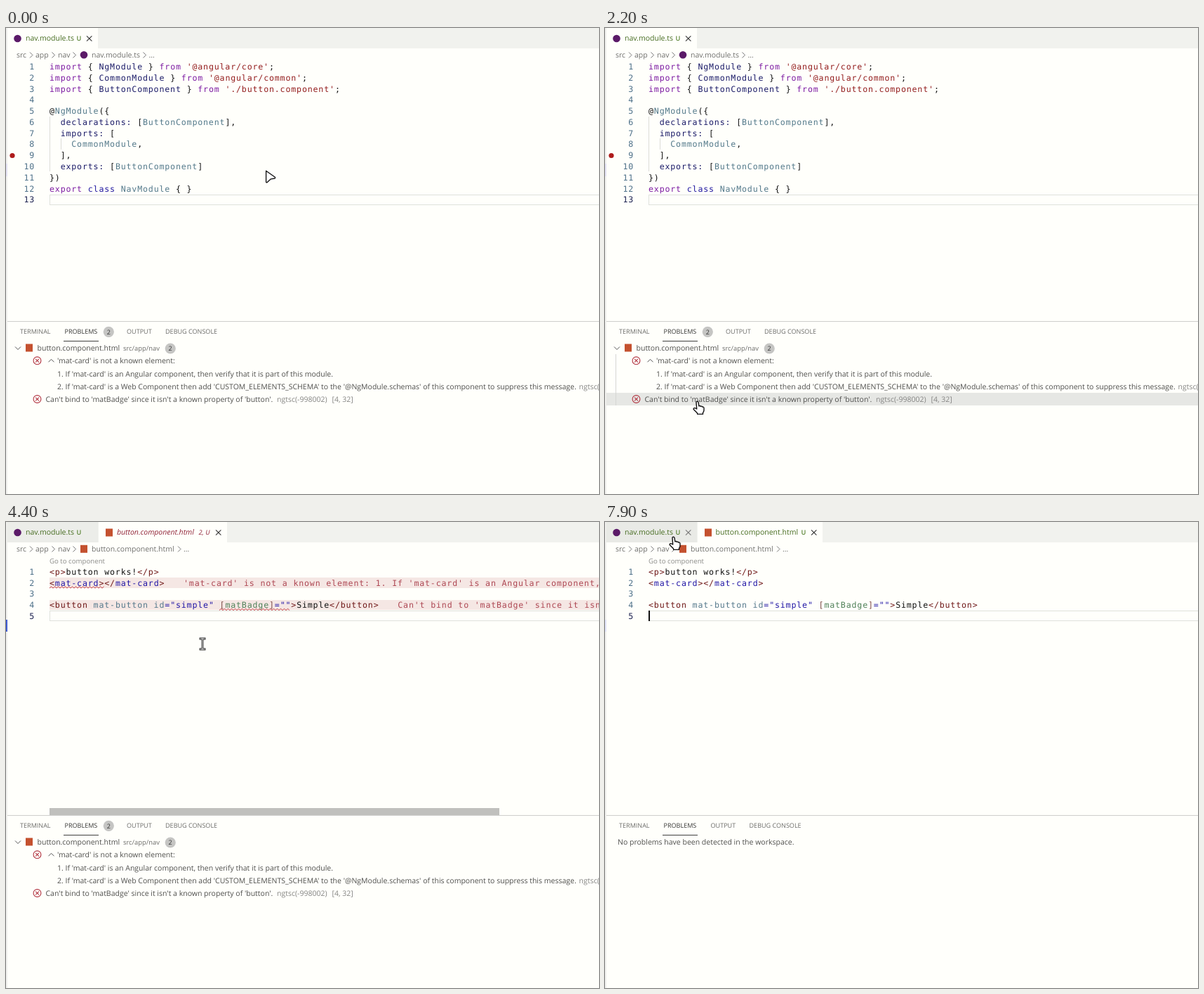
Animation of 845 by 663 pixels, one loop 8 s. Source, as an HTML page with a canvas:

```html
<!DOCTYPE html>
<html lang="en">
<head>
<meta charset="utf-8">
<title>Editor problems panel</title>
<style>
html, body { margin: 0; width: 100%; height: 100%; overflow: hidden; background: #fffffb; }
canvas { display: block; width: 845px; height: 663px; }
</style>
</head>
<body>
<canvas id="stage" width="845" height="663"></canvas>
<script>
const ctx = document.getElementById('stage').getContext('2d');
const W = 845, H = 663, LOOP = 8000;
const OPEN = 2800, FOCUS = 4900, FIXED = 5200;
const UI = '"Open Sans", "Noto Sans", sans-serif';
const MONO = '"DejaVu Sans Mono", monospace';
const ZOOM = 0.83;
const CODE = 14 * ZOOM, GAP = ZOOM, ADV = CODE * 0.602 + GAP, ROW = 19 * ZOOM;
const BG = '#fffffb', TAB_H = 29;
const INK = {
  key: '#7d1ba2', name: '#1b1b68', str: '#941e1e', type: '#53798a', cls: '#2219a0',
  text: '#111111', tag: '#6f1717', blue: '#2116a6', attr: '#55798c', prop: '#4f8058',
  brk: '#7d4a45', err: '#ae4854'
};

const moduleLines = [
  ['key', 'import', 'text', ' { ', 'name', 'NgModule', 'text', ' } ', 'key', 'from ', 'str', "'@angular/core'", 'text', ';'],
  ['key', 'import', 'text', ' { ', 'name', 'CommonModule', 'text', ' } ', 'key', 'from ', 'str', "'@angular/common'", 'text', ';'],
  ['key', 'import', 'text', ' { ', 'name', 'ButtonComponent', 'text', ' } ', 'key', 'from ', 'str', "'./button.component'", 'text', ';'],
  [],
  ['text', '@', 'type', 'NgModule', 'text', '({'],
  ['name', '  declarations:', 'text', ' [', 'type', 'ButtonComponent', 'text', '],'],
  ['name', '  imports:', 'text', ' ['],
  ['type', '    CommonModule', 'text', ','],
  ['text', '  ],'],
  ['name', '  exports:', 'text', ' [', 'type', 'ButtonComponent', 'text', ']'],
  ['text', '})'],
  ['key', 'export ', 'cls', 'class ', 'type', 'NavModule', 'text', ' { }'],
  []
];
const htmlLines = [
  ['tag', '<p>', 'text', 'button works!', 'tag', '</p>'],
  ['tag', '<', 'blue', 'mat-card', 'tag', '></', 'blue', 'mat-card', 'tag', '>'],
  [],
  ['tag', '<button ', 'attr', 'mat-button id', 'blue', '="simple" ', 'brk', '[', 'prop', 'matBadge', 'brk', ']',
    'blue', '=""', 'tag', '>', 'text', 'Simple', 'tag', '</button>'],
  []
];

// time, x, y of the pointer tip
const listPath = [
  [0, 370, 203], [250, 370, 203], [900, 218, 519.5], [1400, 197, 523], [1700, 152, 536], [1900, 131, 532]
];
const editorPath = [[3300, 280, 173], [7200, 280, 173], [7750, 97, 22]];

function along(points, t) {
  let i = 1;
  while (i < points.length - 1 && points[i][0] < t) i++;
  const [a, b] = [points[i - 1], points[i]];
  let p = Math.min(1, Math.max(0, (t - a[0]) / (b[0] - a[0])));
  p = p * p * (3 - 2 * p);
  return [a[1] + (b[1] - a[1]) * p, a[2] + (b[2] - a[2]) * p];
}

function pointer(t) {
  if (t < 2650) return along(listPath, t);
  return t < 3300 ? null : along(editorPath, t);
}

function rect(x, y, w, h, color) {
  ctx.fillStyle = color;
  ctx.fillRect(x, y, w, h);
}

function label(s, x, y, color, size = 10.5, style = '') {
  ctx.font = `${style} ${size}px ${UI}`;
  ctx.letterSpacing = '0px';
  ctx.fillStyle = color;
  ctx.fillText(s, x, y);
}

function code(s, x, y, color) {
  ctx.font = `${CODE}px ${MONO}`;
  ctx.letterSpacing = `${GAP}px`;
  ctx.fillStyle = color;
  ctx.fillText(s, x, y);
}

function stroke(points, color, width = 1) {
  ctx.beginPath();
  points.forEach(([x, y]) => ctx.lineTo(x, y));
  ctx.strokeStyle = color;
  ctx.lineWidth = width;
  ctx.stroke();
}

function disc(x, y, r, color) {
  ctx.beginPath();
  ctx.arc(x, y, r, 0, 7);
  ctx.fillStyle = color;
  ctx.fill();
}

function cross(x, y, r, color) {
  stroke([[x - r, y - r], [x + r, y + r]], color, 1.1);
  stroke([[x + r, y - r], [x - r, y + r]], color, 1.1);
}

const chevronRight = (x, y) => stroke([[x - 2, y - 4], [x + 2, y], [x - 2, y + 4]], '#777');
const moduleIcon = (x, y) => disc(x, y, 5.3, '#5b1a68');
const htmlIcon = (x, y) => rect(x - 5, y - 5.5, 10, 11, '#c4512f');

function badge(x, y) {
  disc(x, y, 7.6, '#c5c5c3');
  label('2', x - 2.6, y + 3.3, '#333', 9);
}

function errorIcon(x, y) {
  ctx.beginPath();
  ctx.arc(x, y, 5.4, 0, 7);
  ctx.strokeStyle = '#b23440';
  ctx.lineWidth = 1.1;
  ctx.stroke();
  cross(x, y, 2.4, '#b23440');
}

function squiggle(x0, x1, y) {
  const points = [];
  for (let x = x0, i = 0; x <= x1; x += 2.5, i++) points.push([x, y + (i % 2 ? -1.1 : 1.1)]);
  stroke(points, '#c43a3f');
}

const rowMid = row => 55 + ROW * row;
const baseline = row => rowMid(row) + 4.1;

function drawCode(lines, firstRow) {
  lines.forEach((line, i) => {
    const y = baseline(firstRow + i);
    const n = String(i + 1);
    code(n, 41.1 - n.length * ADV, y, i === lines.length - 1 ? '#1c2150' : '#4d7088');
    let x = 62;
    for (let k = 0; k < line.length; k += 2) {
      code(line[k + 1], x, y, INK[line[k]]);
      x += line[k + 1].length * ADV;
    }
  });
}

function currentLine(row) {
  const y = Math.round(rowMid(row) - 7.7) + 0.5;
  ctx.strokeStyle = '#dfe1dc';
  ctx.lineWidth = 1;
  ctx.strokeRect(62.5, y, 800, 14);
}

function drawTabs(t, mouse) {
  const html = t >= OPEN, broken = t < FIXED;
  const hover = mouse && mouse[1] < TAB_H && mouse[0] < 131;
  rect(2, 0, W, TAB_H, '#f1f2ee');
  rect(2, 0, 129, TAB_H, html ? (hover ? '#e9eae6' : '#ecede9') : BG);
  moduleIcon(16.5, 15);
  label('nav.module.ts', 28, 18.3, '#456b1f');
  label('U', 100.5, 18.3, '#56812f', 9.2, '600');
  if (!html || hover) cross(118.7, 15, 3.7, html ? '#777' : '#333');
  if (!html) return;
  rect(132, 0, broken ? 183 : 178, TAB_H, BG);
  htmlIcon(147, 15);
  if (broken) {
    label('button.component.html', 158, 18.3, '#92263a', 10.5, 'italic');
    label('2, U', 274.5, 18.3, '#92263a', 9.2, 'italic');
    cross(302.7, 15, 3.7, '#333');
  } else {
    label('button.component.html', 157.5, 18.3, '#456b1f');
    label('U', 279.5, 18.3, '#56812f', 9.2, '600');
    cross(297.7, 15, 3.7, '#333');
  }
}

function drawBreadcrumbs(html) {
  const gray = '#6f6f6d';
  label('src', 15, 42, gray);
  label('app', 42, 42, gray);
  label('nav', 74, 42, gray);
  [36, 67.5, 97.5].forEach(x => chevronRight(x, 38.5));
  (html ? htmlIcon : moduleIcon)(111, 38.3);
  label(html ? 'button.component.html' : 'nav.module.ts', 122, 42, gray);
  chevronRight(html ? 247 : 197.5, 38.5);
  label('…', html ? 253 : 203.5, 42, gray);
}

function drawModule() {
  rect(0, 193, 2, 18, '#e2e0f2');
  currentLine(12);
  rect(62, 126, 1, 78, '#dcdcd8');
  rect(78, 157, 1, 16, '#dcdcd8');
  disc(9, 181.5, 3.6, '#ae1b1b');
  drawCode(moduleLines, 0);
}

function drawTemplate(t) {
  const broken = t < FIXED;
  rect(0, 139, 2, 17, broken ? '#3f5bd0' : '#dfe2f6');
  if (broken) {
    rect(62, 79, W, 15, '#f5e7e4');
    rect(62, 111, W, 14, '#f5e7e4');
  }
  currentLine(5);
  label('Go to component', 62, 58.7, '#8c8c8a', 9.66);
  drawCode(htmlLines, 1);
  if (broken) {
    code("'mat-card' is not a known element: 1. If 'mat-card' is an Angular component, then", 253, baseline(2), INK.err);
    code("Can't bind to 'matBadge' since it isn't a known", 558.3, baseline(4), INK.err);
    squiggle(62, 140, 93);
    squiggle(304, 406, 124.5);
    rect(62, 407, 641, 10, '#c0c0bd');
  }
  if (t >= FOCUS) rect(62, 126, 2, 15, '#111');
}

function drawProblems(mouse) {
  const ink = '#4f4f4d', dim = '#858583';
  if (mouse && mouse[1] >= 446 && mouse[1] < 540) {
    const y = mouse[1];
    const [top, h] = y < 464 ? [446, 18] : y < 519 ? [464, 55] : [519, 18];
    rect(2, top, W, h, '#e6e7e4');
    rect(15, 464, 1, 73, '#d6d6d3');
  }
  stroke([[13, 453.5], [17, 457.5], [21, 453.5]], '#555');
  htmlIcon(33, 455);
  label('button.component.html', 44.5, 459, ink);
  label('src/app/nav', 167, 459, '#6b6b69', 9.4);
  badge(234.2, 456);
  errorIcon(44.5, 473.3);
  stroke([[60.5, 475.3], [64.5, 471.3], [68.5, 475.3]], '#555');
  label("'mat-card' is not a known element:", 73, 477.2, ink);
  label("1. If 'mat-card' is an Angular component, then verify that it is part of this module.", 73, 495.5, ink);
  label("2. If 'mat-card' is a Web Component then add 'CUSTOM_ELEMENTS_SCHEMA' to the '@NgModule.schemas' of this component to suppress this message.", 73, 513.7, ink);
  label('ngtsc(-998001)', 816.5, 513.7, dim);
  errorIcon(44.5, 528);
  label("Can't bind to 'matBadge' since it isn't a known property of 'button'.", 56.5, 531.8, ink);
  label('ngtsc(-998002)', 386, 531.8, dim);
  label('[4, 32]', 464.5, 531.8, dim);
}

function drawPanel(t, mouse) {
  const broken = t < FIXED, shift = broken ? 0 : 21.5;
  const tab = (s, x, color = '#6b6b69') => label(s, x, 435.3, color, 9.05);
  rect(2, 417, W, 1, '#cfcfcc');
  tab('TERMINAL', 20);
  tab('PROBLEMS', 83.5, '#363635');
  tab('OUTPUT', 172 - shift);
  tab('DEBUG CONSOLE', 227 - shift);
  rect(82, 445, 50, 1, '#40403f');
  if (broken) {
    badge(146.3, 432.3);
    drawProblems(mouse);
  } else {
    label('No problems have been detected in the workspace.', 18, 459, '#4f4f4d');
  }
}

function shape(d, width) {
  const p = new Path2D(d);
  ctx.fillStyle = '#fff';
  ctx.strokeStyle = '#111';
  ctx.lineWidth = width;
  ctx.fill(p);
  ctx.stroke(p);
}

function drawPointer(t, [x, y]) {
  const html = t >= OPEN;
  const onList = y >= 446 && y < 540;
  const onTop = html && (y < 46 || (y < 62 && x > 62 && x < 141));
  ctx.save();
  ctx.translate(x, y);
  ctx.lineJoin = ctx.lineCap = 'round';
  if (onList || onTop) {
    ctx.translate(1, -0.6);
    shape('M-2 1 Q-1.6 -.5 0 0 Q1 .3 1.2 2 L1.8 6.5 Q3.5 5.5 4.4 7 Q6 6.2 6.7 7.8 Q8.8 7.2 9 9.3 L9 12.5 Q8.8 15 7.5 16 L7.5 18 L-.3 18 L-.6 16.3 L-5.6 11.4 Q-6.4 9.8 -4.7 9.3 Q-3.5 9.1 -1.3 10.6 Z', 1.4);
  } else if (html) {
    const bar = new Path2D('M-3 -7 H3 M-3 8 H3 M0 -7 V8');
    ctx.lineCap = 'square';
    ctx.strokeStyle = '#222';
    ctx.lineWidth = 2.8;
    ctx.stroke(bar);
    ctx.strokeStyle = '#fff';
    ctx.lineWidth = 0.9;
    ctx.stroke(bar);
  } else {
    shape('M.6 .2 L13.4 9.2 Q14 10.6 12.8 11 L7.4 11.8 L2 16.8 Q.7 17.2 .6 16 Z', 1.35);
  }
  ctx.restore();
}

function draw(t) {
  const mouse = pointer(t), html = t >= OPEN;
  ctx.textRendering = 'geometricPrecision';
  rect(0, 0, W, H, BG);
  rect(0, 0, 2, H, '#efefec');
  drawTabs(t, mouse);
  drawBreadcrumbs(html);
  html ? drawTemplate(t) : drawModule();
  drawPanel(t, mouse);
  if (mouse) drawPointer(t, mouse);
}

const start = performance.now();
function frame() {
  draw((performance.now() - start) % LOOP);
  requestAnimationFrame(frame);
}
frame();
</script>
</body>
</html>
```
